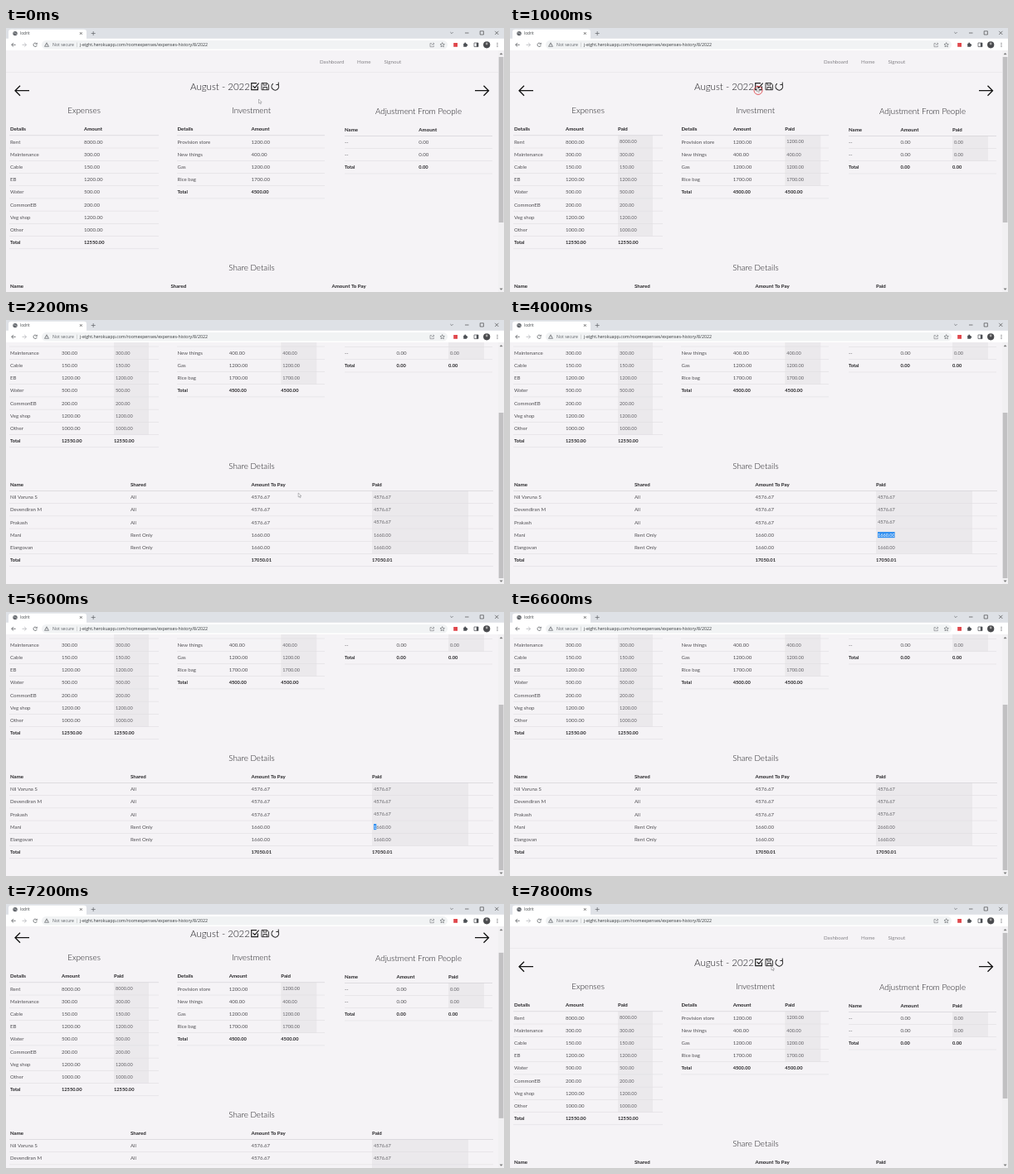
These frames come from a looping animation (600x319 px, 8 s). An HTML page with a canvas:

```html
<!DOCTYPE html>
<html lang="en">
<head>
<meta charset="utf-8">
<title>Room expenses</title>
<style>
html, body { margin: 0; width: 100%; height: 100%; overflow: hidden; background: #f5f3f6; }
canvas { display: block; width: 600px; height: 319px; }
</style>
</head>
<body>
<canvas id="stage" width="600" height="319"></canvas>
<script>
const ctx = document.getElementById('stage').getContext('2d');
const LOOP = 8000, STEP = 200, PITCH = 15.22, MAX_SCROLL = 113;
const PAGE = 'Lato, sans-serif', UI = '"Open Sans", sans-serif';
const BODY = '#515054', FIELD = '#626166', DARK = '#252427', ICON = '#5f6266';

const tables = [
  { x: 4, end: 184, y: 122.2, head: ['Details', 'Amount'], view: [5, 94], edit: [5, 67, 130], box: 42,
    rows: [['Rent', '8000.00'], ['Maintenance', '300.00'], ['Cable', '150.00'], ['EB', '1200.00'],
      ['Water', '500.00'], ['CommonEB', '200.00'], ['Veg shop', '1200.00'], ['Other', '1000.00']],
    total: ['Total', '12550.00'] },
  { x: 206, end: 384, y: 122.2, head: ['Details', 'Amount'], view: [206.5, 295.5], edit: [206.5, 268.7, 331.3], box: 43,
    rows: [['Provision store', '1200.00'], ['New things', '400.00'], ['Gas', '1200.00'], ['Rice bag', '1700.00']],
    total: ['Total', '4500.00'] },
  { x: 408, end: 586, y: 122.7, head: ['Name', 'Amount'], view: [408, 497.3], edit: [408, 470.5, 533], box: 43,
    rows: [['--', '0.00'], ['--', '0.00']],
    total: ['Total', '0.00'] },
  { x: 4, end: 587, y: 311.8, head: ['Name', 'Shared', 'Amount To Pay'], view: [5, 198.5, 392.5],
    edit: [5, 150, 295.5, 441], box: 116,
    rows: [['Nil Varuna S', 'All', '4576.67'], ['Devendiran M', 'All', '4576.67'], ['Prakash', 'All', '4576.67'],
      ['Mani', 'Rent Only', '1660.00'], ['Elangovan', 'Rent Only', '1660.00']],
    total: ['Total', '', '17050.01'] }
];
const share = tables[3], EDITED = 3;

const clamp = (v, lo, hi) => Math.max(lo, Math.min(hi, v));
const ramp = (t, from, to) => clamp((t - from) / (to - from), 0, 1);

// y is the vertical middle of the capitals
function text(str, x, y, size = 6.1, color = BODY, weight = 400, family = PAGE, align = 'left') {
  ctx.font = `${weight} ${size}px ${family}`;
  ctx.textAlign = align;
  ctx.fillStyle = color;
  ctx.fillText(str, x, y + size * 0.36);
}

function rect(x, y, w, h, color) {
  ctx.fillStyle = color;
  ctx.fillRect(x, y, w, h);
}

function stroke(d, color = ICON, width = 0.8, fill) {
  const path = new Path2D(d);
  if (fill) { ctx.fillStyle = fill; ctx.fill(path); }
  ctx.strokeStyle = color;
  ctx.lineWidth = width;
  ctx.stroke(path);
}

function round(x, y, w, h, r, color) {
  ctx.beginPath();
  ctx.roundRect(x, y, w, h, r);
  ctx.fillStyle = color;
  ctx.fill();
}

function disc(x, y, r, color) {
  ctx.beginPath();
  ctx.arc(x, y, r, 0, 7);
  ctx.fillStyle = color;
  ctx.fill();
}

function arc(x, y, r, from, to, color = ICON, width = 0.8) {
  ctx.beginPath();
  ctx.arc(x, y, r, from, to);
  ctx.strokeStyle = color;
  ctx.lineWidth = width;
  ctx.stroke();
}

function drawTable(table, editing, t) {
  const cols = editing ? table.edit : table.view;
  const paidX = table.edit[table.edit.length - 1];
  const { rows, total, y } = table;
  const top = y + PITCH / 2;
  const withPaid = (row, paid) => editing ? [...row, paid] : row;
  const line = (cells, cy, size) => cells.forEach((s, c) => text(s, cols[c], cy, size, DARK, 700));

  if (editing) rect(paidX, top, table.box, rows.length * PITCH, '#ebe9ec');
  for (let i = 0; i <= rows.length + 1; i++) {
    rect(table.x, top + i * PITCH - 0.3, table.end - table.x, 0.6, i ? '#dfdde1' : '#cfcdd2');
  }
  line(withPaid(table.head, 'Paid'), y, 6.1);
  rows.forEach((row, i) => {
    const cy = y + (i + 1) * PITCH;
    row.forEach((s, c) => text(s, cols[c], cy));
    if (!editing) return;
    const active = table === share && i === EDITED;
    const value = active && t >= 6000 ? '2660.00' : row[row.length - 1];
    text(value, paidX + 2, cy, 5.6, FIELD);
    if (active) drawSelection(value, paidX + 2, cy, t);
  });
  line(withPaid(total, total[total.length - 1]), y + (rows.length + 1) * PITCH, 5.7);
}

function drawSelection(value, x, y, t) {
  const full = ctx.measureText(value).width;
  const digit = ctx.measureText(value[0]).width;
  let from = 0, to = 0;
  if (t >= 3400 && t < 4800) {
    from = full * (1 - ramp(t, 3200, 4000));
    to = full;
  } else if (t >= 5600 && t < 6000) {
    to = digit;
  } else if (t >= 4800 && t < 5200 || t === 5400) {
    rect(x + digit, y - 3.3, 0.4, 6.6, DARK);
  }
  if (to <= from) return;
  ctx.save();
  ctx.beginPath();
  ctx.rect(x + from, y - 3.7, to - from, 7.2);
  ctx.clip();
  rect(x, y - 4, full, 8, '#3390f0');
  text(value, x, y, 5.6, '#fff');
  ctx.restore();
}

function drawPage(t) {
  const editing = t >= 1000;
  [['Dashboard', 378], ['Home', 423], ['Signout', 455.5]].forEach(([s, x]) => text(s, x, 40.8, 6.2, '#858388'));
  rect(0, 53.3, 593, 0.6, '#e6e4e8');

  const title = (s, x, y, size = 9.8) => text(s, x, y, size, '#1e1d21', 300, PAGE, 'center');
  title('August - 2022', 258, 71, 11.5);
  title('Expenses', 94, 99.6);
  title('Investment', 295.7, 99.6);
  title('Adjustment From People', 497, 100);
  title('Share Details', 295.9, 289.3);

  stroke('M28 75.7H11M17 69.7L11 75.7L17 81.7', '#111', 1.3);
  stroke('M565 75.7H581.5M575.5 69.7L581.5 75.7L575.5 81.7', '#111', 1.3);
  stroke('M303.4 70.5V74.6H295.7V66.6H302M297.5 69.8L299.8 72.3L304.6 66.6', '#222', 1.2);
  stroke('M308 66.5H314.5L316.5 68.5V74.7H308ZM310 66.5V69H314V66.5M310 74.7V71.5H314.5V74.7', '#222', 0.9);
  arc(324.3, 70.8, 4.3, -0.75, 4.1, '#222', 1.1);
  stroke('M328.3 65.5V68.5H325.3', '#222', 0.9);

  tables.forEach(table => drawTable(table, editing, t));
}

function drawScrollbar(scroll) {
  rect(593, 27, 7, 292, '#f1f0f2');
  rect(593.7, 35 + scroll * 77 / MAX_SCROLL, 5.7, 200, '#c1c0c2');
  stroke('M595 32L596.6 30.2L598.2 32Z', '#777', 0.4, '#777');
  stroke('M595 314.8L596.6 316.6L598.2 314.8Z', '#777', 0.4, '#777');
}

function drawBrowser() {
  rect(0, 0, 600, 13, '#dee1e6');
  round(3, 1.8, 94, 14, 3, '#fff');
  rect(0, 12.8, 600, 14.2, '#fff');
  disc(11, 6.6, 2.7, '#5f6368');
  stroke('M8.8 6H11.5L12.5 8', '#d8dadd', 0.6);
  text('lodrit', 17, 6.6, 4.7, '#3c4043', 400, UI);
  stroke('M89 5.2L91.6 7.8M91.6 5.2L89 7.8', '#333', 0.7);
  stroke('M102.7 6.5H107.7M105.2 4V9', ICON, 0.7);
  stroke('M535.3 5L537 6.7L538.7 5', ICON, 0.7);
  stroke('M553 6H557.5M571.2 3.8H575.4V8H571.2ZM589.2 3.8L593.4 8M593.4 3.8L589.2 8', '#333', 0.6);

  stroke('M11.7 20.3H6.7M9 18L6.7 20.3L9 22.6');
  stroke('M19.5 20.3H24.5M22.2 18L24.5 20.3L22.2 22.6', '#b5b7ba');
  arc(35.2, 20.3, 2.2, 0.3, 5.5);
  stroke('M37.4 17.8V19.7H35.5', ICON, 0.7);
  round(43, 15, 489, 10.6, 5.3, '#f1f3f4');
  stroke('M49 17.8L51.5 22.3H46.5Z', ICON, 0.7);
  rect(48.7, 19.4, 0.6, 1.5, ICON);
  text('Not secure', 56, 20.3, 5.15, '#5f6368', 400, UI);
  rect(85, 17.6, 0.5, 5.5, '#b4b7bb');
  text('j-eight.herokuapp.com/roomexpenses/expenses-history/8/2022', 89, 20.3, 5.2, '#333639', 400, UI);
  stroke('M513 18.5H511V22.7H515.3V21M512.8 21Q513 19 515.8 19M514.6 17.7L516 19L514.6 20.3', '#777a7e', 0.6);
  stroke('M525.7 17.6L526.5 19.5L528.4 19.6L526.9 20.9L527.4 22.8L525.7 21.8L524 22.8L524.5 20.9L523 19.6L524.9 19.5Z', ICON, 0.6);
  rect(539.2, 18, 4.8, 4.8, '#e0474c');
  round(551.2, 18.7, 4, 4.1, 0.5, '#4d5055');
  disc(553.2, 18.5, 0.9, '#4d5055');
  disc(555.4, 20.7, 0.9, '#4d5055');
  stroke('M564 18H569V22.6H564Z', '#4d5055', 0.7);
  rect(566.8, 18, 2.2, 4.6, '#4d5055');
  disc(579.2, 20.3, 4.1, '#4a4b4e');
  disc(579.2, 19, 1.4, '#a3a2a2');
  [18.3, 20.3, 22.3].forEach(y => disc(592, y, 0.6, '#4d5055'));
}

function drawPointer(t) {
  if (t >= 2600 && t < 7400) return;
  let x, y;
  if (t < 1400) {
    const p = ramp(t, 0, 800);
    x = 304.5 - 7 * p;
    y = 86 - 14 * p;
  } else if (t < 2600) {
    const p = ramp(t, 1200, 2200);
    x = 297.5 + 54.7 * p;
    y = 72 + 137 * p;
  } else {
    const p = ramp(t, 7200, 7800);
    x = 345 - 30 * p;
    y = 130 - 55 * p;
  }
  if (t === 800 || t === 1000) arc(x + 1.5, y + 3.4, 5, 0, 7, '#e0474c', 0.9);
  ctx.save();
  ctx.translate(x, y);
  stroke('M0 0V5L1.2 4L2 5.8L2.9 5.4L2.1 3.6H3.6Z', '#77767a', 0.5, '#fff');
  ctx.restore();
}

function draw(t) {
  const down = (t - 1400) / STEP * 39;
  const up = MAX_SCROLL - (t - 6800) / STEP * 39;
  const scroll = clamp(Math.min(down, up), 0, MAX_SCROLL);
  rect(0, 0, 600, 319, '#f5f3f6');
  ctx.save();
  ctx.translate(0, -scroll);
  drawPage(t);
  ctx.restore();
  drawScrollbar(scroll);
  drawBrowser();
  drawPointer(t);
}

const start = performance.now();
function tick() {
  const t = (performance.now() - start) % LOOP;
  draw(Math.floor(t / STEP) * STEP);
  requestAnimationFrame(tick);
}
tick();
</script>
</body>
</html>
```
